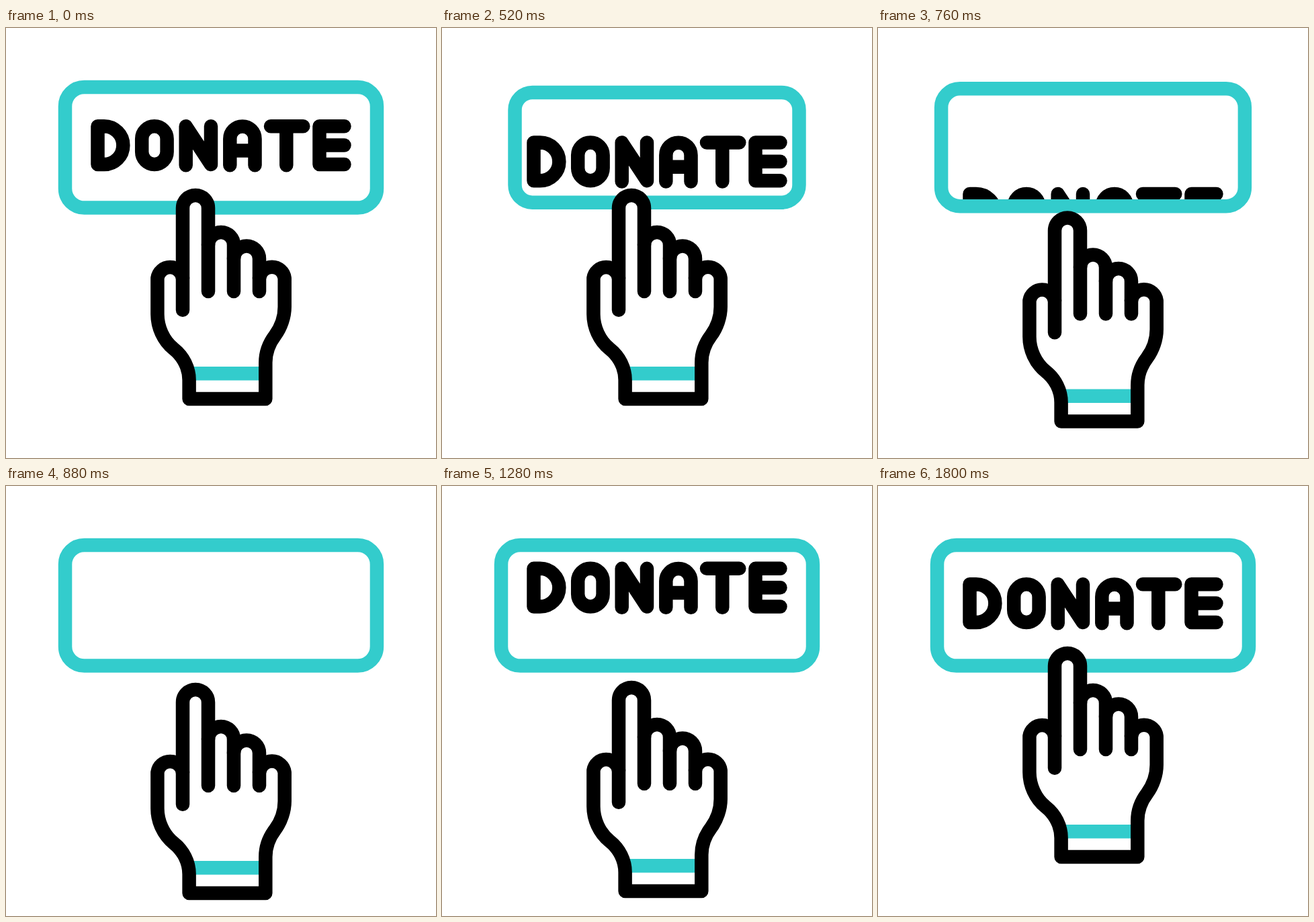
Write an HTML page that moves like this. It is 640x640 px and loops after 1920 ms.

```html
<!DOCTYPE html>
<html lang="en">
<head>
<meta charset="utf-8">
<title>Donate button</title>
<style>
  html, body { margin: 0; height: 100%; overflow: hidden; background: #fff; }
  svg { display: block; width: 100vw; height: 100vh; }
  svg * { stroke-width: 20.5; stroke-linecap: round; stroke-linejoin: round; }
  .ink { fill: none; stroke: #000; }
  .accent { fill: none; stroke: #3cc; }
</style>
</head>
<body>
<svg viewBox="0 0 640 640" role="img" aria-label="DONATE">
  <clipPath id="window"><rect class="panel"/></clipPath>
  <g clip-path="url(#window)">
    <g id="word" class="ink">
      <path d="M136.5 146.3H146A28.35 28.35 0 0 1 146 203H136.5Z"/>
      <rect x="202.2" y="146.3" width="37.4" height="56.7" rx="18.7"/>
      <path d="M267.7 204.3V146.3L305 203V146.3"/>
      <path d="M333.3 204.3V165A18.6 18.6 0 0 1 370.5 165V204.3M333.3 182.4H370.5"/>
      <path d="M394 146.3H442.3M417.3 146.3V204.3"/>
      <path d="M503.5 146.3H466.5V203H503.5M466.5 174.6H503.5"/>
    </g>
  </g>
  <rect class="panel accent"/>
  <g id="hand">
    <path class="accent" d="M275 514.3H384"/>
    <path id="finger" class="ink" style="fill:#fff"/>
    <g class="ink">
      <path d="M301 323A19 19 0 0 1 339 323V392"/>
      <path d="M339 343.5A19 19 0 0 1 377 343.5V392"/>
      <path d="M377 372.3A19 19 0 0 1 414.7 372.3V415C414.7 430 409 446 400.5 457.5
        C391 470 386.3 483 386.3 498V552H272.6V524C272.6 506 264 489 249.5 477.5
        C234 465 225.4 445 225.4 426V372.3A19 19 0 0 1 263 372.3"/>
    </g>
  </g>
</svg>
<script>
const LOOP = 1920, STEP = 40;
const $ = id => document.getElementById(id);
const panels = document.querySelectorAll('.panel');

const progress = (t, from, to) => Math.min(1, Math.max(0, (t - from) / (to - from)));
const smooth = u => u * u * (3 - 2 * u);
const ramp = (t, from, to) => smooth(progress(t, from, to));
const pulse = (t, start, peak, end) => ramp(t, start, peak) - ramp(t, peak, end);

// Cubic easing with handles (a, 0) and (b, 1)
function ease(u, a, b) {
  let low = 0, high = 1;
  for (let i = 0; i < 24; i++) {
    const s = (low + high) / 2, r = 1 - s;
    if (3 * a * r * r * s + 3 * b * r * s * s + s ** 3 < u) low = s;
    else high = s;
  }
  return smooth(low);
}

function drawPanel(t) {
  const scale = 1 - 0.0885 * pulse(t, 100, 530, 890);
  const width = 464 * scale, height = 179.6 * scale;
  for (const panel of panels) {
    panel.setAttribute('x', 320 - width / 2);
    panel.setAttribute('y', 177.8 - height / 2);
    panel.setAttribute('width', width);
    panel.setAttribute('height', height);
    panel.setAttribute('rx', 28.5 * scale);
  }
}

// The word falls out through the bottom and drops back in from the top
function drawWord(t) {
  const y = t < 960
    ? 4.54e-4 * Math.max(0, t - 289) ** 2
    : -4e-4 * Math.max(0, 1522 - t) ** 2;
  $('word').setAttribute('transform', `translate(0 ${y})`);
}

function drawHand(t) {
  const y = 60 * (ramp(t, 515, 970) - ease(progress(t, 980, 1800), 0.71, 0.4));
  $('hand').setAttribute('transform', `translate(0 ${y})`);
  const squeeze = pulse(t, 100, 310, 520);
  const radius = 19 - 2.5 * squeeze, top = 268 + 1.5 * squeeze;
  $('finger').setAttribute('d',
    `M263 419.8V372L${282 - radius} ${top}` +
    `A${radius} ${radius} 0 0 1 ${282 + radius} ${top}L301 323V392`);
}

function render(now) {
  const t = Math.floor((now % LOOP) / STEP) * STEP;
  drawPanel(t);
  drawWord(t);
  drawHand(t);
}

const start = performance.now();
function tick() {
  render(performance.now() - start);
  requestAnimationFrame(tick);
}
tick();
</script>
</body>
</html>
```
